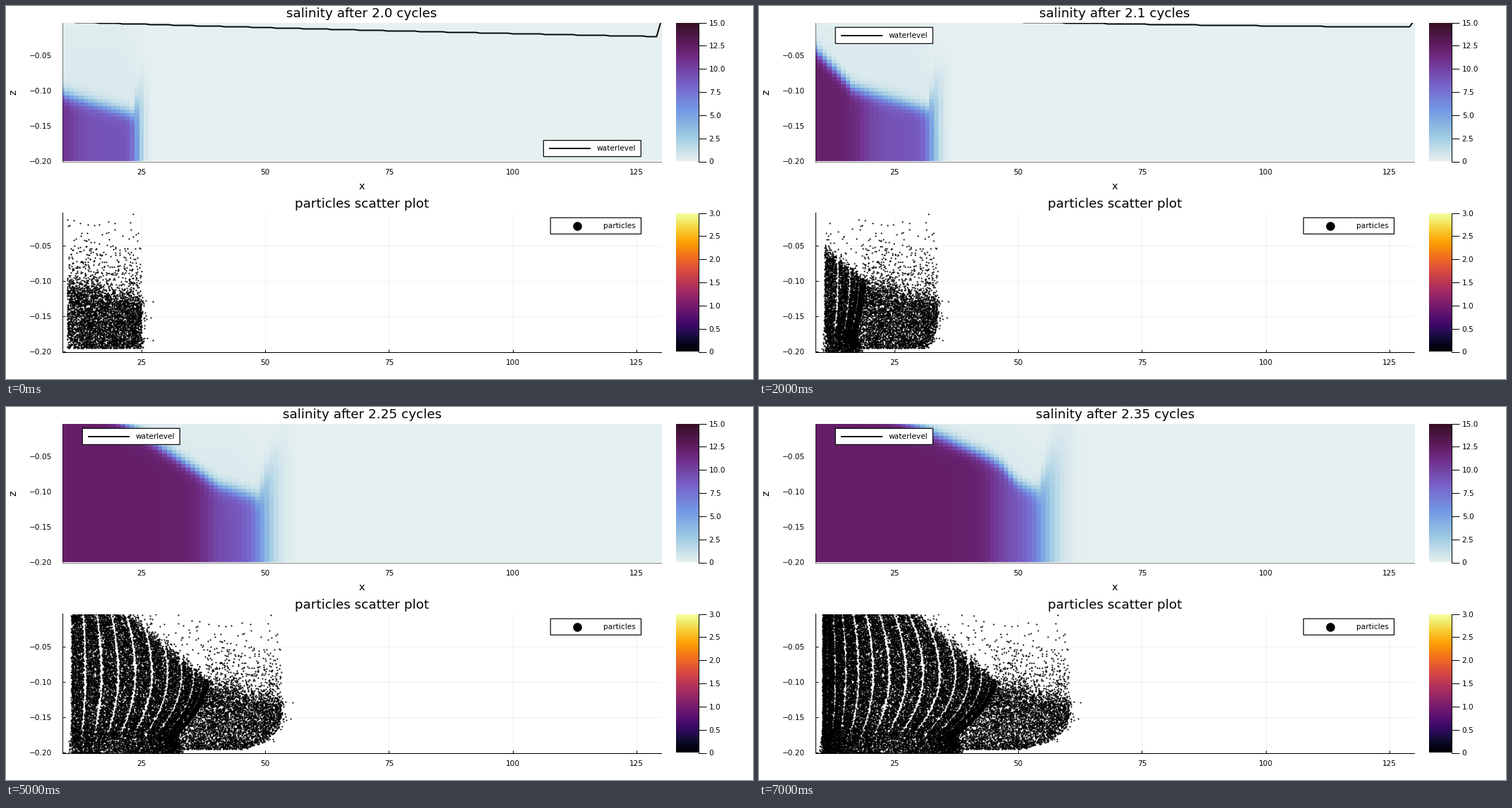
Recreate the animation shown at these times as a matplotlib script. Size 1058x529 px, loop 8 s.

```python
import numpy as np
import matplotlib.pyplot as plt
from matplotlib.animation import FuncAnimation
from matplotlib.colors import LinearSegmentedColormap
from matplotlib.patches import Rectangle

W, H, DPI = 1058, 529, 100
FRAMES, INTERVAL = 8, 1000
LEFT, WIDTH, HEIGHT = 79.5, 848.5, 197
UPPER_TOP, LOWER_TOP = 23.5, 293.5
X0, X1, Z0, Z1 = 9, 130, -0.2, -0.003
INLET = 10
PT = 72 / DPI  # points per pixel
TITLE, LABEL, SMALL = 18.4, 14.4, 10.5  # text sizes in pixels

plt.rcParams.update({"font.family": "DejaVu Sans", "axes.linewidth": PT})

DENSE = LinearSegmentedColormap.from_list("dense", [
    (0, "#e6f0f0"), (0.18, "#9cc9e2"), (0.364, "#739ae4"), (0.545, "#7864ca"),
    (0.727, "#71328d"), (0.818, "#641f68"), (1, "#360e24")])

COLS, ROWS = 130, 40
xs = np.linspace(X0, X1, COLS)
zs = np.linspace(Z1, Z0, ROWS)[:, None]
DX, DZ = (X1 - X0) / (COLS - 1), (Z1 - Z0) / (ROWS - 1)


def falling(x, centre, width):
    """Smooth step from 1 down to 0."""
    return 1 / (1 + np.exp(np.clip((x - centre) / width, -50, 50)))


def drift(step):
    """Distance the flood tide has carried the water since the first step."""
    return 18.25 * (np.sin(0.378 * (step - 3.3)) + np.sin(0.378 * 3.3))


def salinity(step):
    d = drift(step)
    junction = INLET + d  # where new sea water meets the older wedge
    front = 24.2 + d - 0.0035 * d ** 2

    old_top = -0.108 + 0.0007 * d - 0.002 * (xs - junction)
    slope = 0.0075 * (1 - (d / 46) ** 2)
    new_top = np.maximum(slope * (0.92 * d - 4.5 - xs) + Z1, old_top)
    top = old_top + (new_top - old_top) * falling(xs, junction + 3, 1)
    top += 0.02 * np.maximum(xs - front + 1, 0)

    below = 9 * falling(xs, front, 0.65 + 0.03 * d) + 3.2 * falling(xs, junction, 1.6)
    share = falling(zs, top, np.interp(below, [2, 7], [0.018, 0.005]))
    depth = (Z1 - zs) / (Z1 - Z0)
    haze = 0.07 * np.minimum(below, 9) * (0.35 + 0.65 * depth) * (1 - share)
    return below * share + haze


def waterlevel(step):
    """Level along x in whole millimetres; the last point is dry."""
    s = np.linspace(0, 1, COLS)
    fall = 0.002 + 0.0255 * s - 0.0045 * s ** 2
    tide = (0.006 + 0.004 * s + 0.0035 * s ** 2) * (step / 2) ** 1.3
    level = np.round(tide - fall, 3)
    level[-1] = 0
    return level


rng = np.random.default_rng(7)


def old_particles(dense=4200, sparse=600, stray=8):
    n = dense + sparse
    x = rng.uniform(INLET, 25, n) + (rng.random(n) < 0.15) * rng.random(n)
    top = -0.108 - 0.0013 * (x - INLET) + 0.006 * rng.normal(size=n)
    z = rng.uniform(-0.195, top)
    z[dense:] = top[dense:] + rng.exponential(0.028, sparse)
    return (np.append(x, 25.5 + rng.exponential(1, stray)),
            np.append(z, rng.uniform(-0.19, -0.1, stray)))


def trail_speed(z):
    """Bulging profile of the inflow, slower near bed and surface."""
    off = z + 0.09
    return 1 - np.where(off < 0, 0.24 * (np.maximum(off, -0.085) / 0.085) ** 2,
                        0.15 * (off / 0.09) ** 2)


def lead_speed(z):
    return 1 - 0.28 * (np.maximum(-0.13 - z, 0) / 0.065) ** 4


old_x, old_z = old_particles()
lead = np.clip((old_x - INLET) / 15, 0, 1)
old_speed = (1 - lead) * trail_speed(old_z) + lead * lead_speed(old_z)

# Particles enter in two bursts per step, with a short pause after each.
BURSTS, PER_BURST = 2 * (FRAMES - 1), 2200
count = BURSTS * PER_BURST
release = (np.repeat(np.arange(BURSTS), PER_BURST) + 0.84 * rng.random(count)) / 2
new_z = rng.uniform(Z0, 0, count)
new_speed = trail_speed(new_z)
blur = 0.1 + 1.6 * np.clip((-0.16 - new_z) / 0.04, 0, 1)
new_x = INLET + 0.4 + blur * rng.uniform(-0.4, 1, count)
fuzz = 0.006 * rng.normal(size=count)
fuzz += (rng.random(count) < 0.04) * rng.exponential(0.03, count)


def particles(step):
    d = drift(step)
    x = new_x + new_speed * (d - drift(release))
    top = -0.1 + 0.006 * (INLET + d - x)
    shown = (release < step) & (new_z < top + fuzz)
    return np.append(old_x + old_speed * d, x[shown]), np.append(old_z, new_z[shown])


fig = plt.figure(figsize=(W / DPI, H / DPI), dpi=DPI, facecolor="white")


def box(left, top, width, height):
    return fig.add_axes([left / W, 1 - (top + height) / H, width / W, height / H])


def panel(top, tick_length):
    ax = box(LEFT, top, WIDTH, HEIGHT)
    ax.set(xlim=(X0, X1), ylim=(Z0, Z1), xticks=range(25, 126, 25),
           yticks=[-0.2, -0.15, -0.1, -0.05])
    ax.yaxis.set_major_formatter(lambda v, _: f"{v:.2f}".replace("-", "\u2212"))
    ax.tick_params(direction="in", length=tick_length * PT, width=PT, labelsize=SMALL * PT)
    ax.tick_params(axis="x", pad=15.6 * PT)
    ax.tick_params(axis="y", pad=14.5 * PT)
    for label in ax.get_xticklabels():
        label.set_verticalalignment("center")
    ax.spines[["top", "right"]].set_visible(False)
    return ax


def colorbar(top, cmap, vmax, ticks):
    ax = box(949, top, 31.7, HEIGHT)
    ax.imshow(np.linspace(0, 1, 256)[:, None], cmap=cmap, aspect="auto",
              origin="lower", extent=(0, 1, 0, vmax))
    ax.yaxis.tick_right()
    ax.set(xticks=[], yticks=ticks)
    ax.yaxis.set_major_formatter(lambda v, _: f"{v:.1f}" if v else "0")
    ax.tick_params(length=11 * PT, width=PT, pad=4 * PT, labelsize=SMALL * PT)
    ax.spines[["left", "top", "bottom"]].set_visible(False)


upper, lower = panel(UPPER_TOP, 0), panel(LOWER_TOP, 4)
upper.spines[["left", "bottom"]].set_color((0, 0, 0, 0.5))
lower.grid(color="black", alpha=0.08, linewidth=0.7 * PT)
lower.set_axisbelow(True)
colorbar(UPPER_TOP, DENSE, 15, np.arange(0, 15.1, 2.5))
colorbar(LOWER_TOP, "inferno", 3, np.arange(0, 3.1, 0.5))

heat = upper.imshow(np.zeros((ROWS, COLS)), cmap=DENSE, vmin=0, vmax=15, aspect="auto",
                    interpolation="nearest",
                    extent=(X0 - DX / 2, X1 + DX / 2, Z0 - DZ / 2, Z1 + DZ / 2))
upper.set(xlim=(X0, X1), ylim=(Z0, Z1))
water, = upper.plot([], [], color="black", lw=1.9 * PT)
dots, = lower.plot([], [], "o", color="black", ms=2.1 * PT, mew=0)

# Overlay in stage pixels for titles, axis names and legends.
stage = box(0, 0, W, H)
stage.set(xlim=(0, W), ylim=(H, 0))
stage.axis("off")


def write(x, y, text, size, ha="center"):
    return stage.text(x, y + 0.32 * size, text, size=size * PT, ha=ha, va="baseline")


def legend_box(x, y, width):
    return stage.add_patch(Rectangle((x, y), width, 23, fc="white", ec="black",
                                     lw=1.2 * PT, snap=False))


title = write(504, 10, "", TITLE)
write(504, 280, "particles scatter plot", TITLE)
write(504, 255.4, "x", LABEL)
stage.text(10.5, 122, "z", size=LABEL * PT, ha="center", va="center", rotation=90)

legend_box(771.2, 300.3, 128.3)
stage.plot(809.3, 311.8, "o", color="black", ms=12.6 * PT, mew=0)
write(846, 312, "particles", SMALL, "left")

key_box = legend_box(0, 0, 138)
key_line, = stage.plot([], [], color="black", lw=1.9 * PT)
key_text = write(0, 0, "waterlevel", SMALL, "left")


def update(step):
    title.set_text(f"salinity after {round(2 + 0.05 * step, 2)} cycles")
    heat.set_data(salinity(step))
    water.set_data(xs, waterlevel(step))
    dots.set_data(*particles(step))
    x, y = (761.3, 190.6) if step < 2 else (108.2, 30.3)
    key_box.set_xy((x, y))
    key_line.set_data([x + 9, x + 66], [y + 11.5] * 2)
    key_text.set_position((x + 75, y + 11.5 + 0.32 * SMALL))
    return title, heat, water, dots, key_box, key_line, key_text


anim = FuncAnimation(fig, update, frames=FRAMES, interval=INTERVAL,
                     init_func=lambda: update(0), repeat=True, repeat_delay=0)
plt.show()
```
